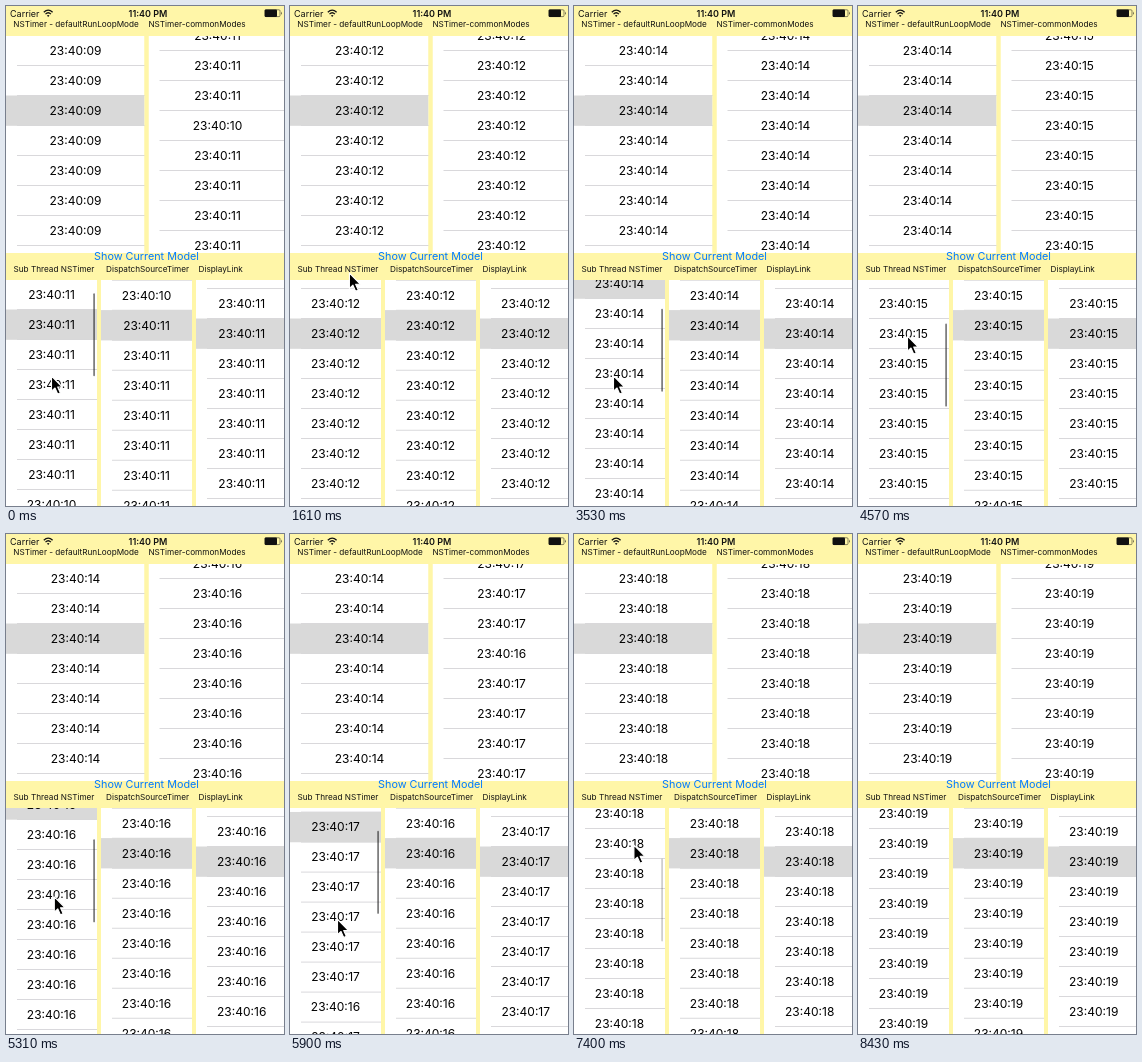
Write an HTML page that moves like this. It is 278x500 px and loops after 8.53 s.

```html
<!DOCTYPE html>
<html lang="en">
<head>
<meta charset="utf-8">
<title>Timer modes</title>
<style>
  html, body { margin: 0; width: 100%; height: 100%; overflow: hidden; background: #fff6a8; }
  #stage { display: block; width: 278px; height: 500px; }
  text { font-family: Inter, "Open Sans", sans-serif; font-size: 8.2px; fill: #111; white-space: pre; }
  .bar { font-size: 9px; }
  .clock { font-size: 9px; font-weight: 600; text-anchor: middle; }
  .link { font-size: 10.8px; fill: #007aff; text-anchor: middle; }
  .row { font-size: 12px; text-anchor: middle; fill: #000; }
</style>
</head>
<body>
<svg id="stage" viewBox="0 0 278 500">
  <rect width="278" height="500" fill="#fff6a8"/>
  <text class="bar" x="4" y="10.5">Carrier</text>
  <g fill="none" stroke="#111" stroke-width="1.3">
    <path d="M37.8 6.2Q42.2 2 46.6 6.2M39.5 8.1Q42.2 5.5 44.9 8.1"/>
    <path d="M42.2 11L40.9 9.5Q42.2 8.4 43.5 9.5Z" fill="#111" stroke="none"/>
  </g>
  <text class="clock" x="142" y="10.5">11:40 PM</text>
  <rect x="259" y="3.8" width="15" height="6.8" rx="1" fill="none" stroke="#111" stroke-width=".5"/>
  <rect x="258.7" y="3.5" width="12.3" height="7.4" rx="1" fill="#111"/>
  <path d="M275 5.5v3.4q1.4-1.7 0-3.4" fill="#111"/>
  <text x="7.3" y="21">NSTimer - defaultRunLoopMode</text>
  <text x="142.4" y="21">NSTimer-commonModes</text>
  <text x="7.5" y="266">Sub Thread NSTimer</text>
  <text x="100" y="266">DispatchSourceTimer</text>
  <text x="192.5" y="266">DisplayLink</text>
  <g id="tables"></g>
  <text class="link" x="140.5" y="254">Show Current Model</text>
  <path id="cursor" d="M0 0V15.2L3.5 12L6.2 18L8.8 16.9L6.2 11H10.8Z" stroke="#fff" stroke-width="1.1" stroke-linejoin="round"/>
</svg>
<script>
const LOOP = 8530, STEP = 147.7, ROW = 30;
const DRAG_START = 3080, DRAG_END = 6950;
const $ = id => document.getElementById(id);

function add(parent, tag, attrs) {
  const el = document.createElementNS("http://www.w3.org/2000/svg", tag);
  for (const k in attrs) el.setAttribute(k, attrs[k]);
  return parent.appendChild(el);
}

const tick = (t, period) => 11 + Math.floor(t / period);

// The default-mode timer stalls while the list is being dragged.
function stalledTick(t) {
  if (t < 300) return 9;
  return t >= DRAG_START && t < 7200 ? 14 : tick(t, 980);
}

// lateRow refreshes a little after its neighbours.
const tables = [
  { x: 0, y: 30, w: 138.5, h: 217, mid: 69.5, off: 0, sec: stalledTick },
  { x: 142.5, y: 30, w: 135.5, h: 217, mid: 69, off: 105, sec: t => tick(t, 980), lateRow: 6, lag: 250 },
  { x: 0, y: 274, w: 91, h: 226, mid: 45.5, off: 30, sec: t => tick(t, 980), lateRow: 8, lag: 200 },
  { x: 95, y: 274, w: 91, h: 226, mid: 45.5, off: 29.4, sec: t => tick(t, 990), lateRow: 1, lag: 100 },
  { x: 190, y: 274, w: 88, h: 226, mid: 45.7, off: 21, sec: t => tick(t + 330, 990) }
];

for (const tb of tables) {
  tb.view = add($("tables"), "svg", { x: tb.x, y: tb.y, width: tb.w, height: tb.h });
  add(tb.view, "rect", { width: tb.w, height: tb.h, fill: "#fff" });
  tb.list = add(tb.view, "g", { transform: `translate(0 ${-tb.off})` });
  for (let i = 0; i < 14; i++)
    add(tb.list, "rect", { x: 11, y: ROW * i + 29.2, width: tb.w, height: 0.8, fill: "#d0cfd3" });
  add(tb.list, "rect", { y: ROW * 2 - 0.5, width: tb.w, height: ROW + 0.3, fill: "#d9d9d9" });
  tb.rows = Array.from({ length: 14 }, (_, i) =>
    add(tb.list, "text", { class: "row", x: tb.mid, y: ROW * i + 19 }));
}
const scrolled = tables[2];
const thumb = add(scrolled.view, "rect", { x: 87.2, width: 1.8, height: 83, rx: 0.9, fill: "#000" });

// time, x, y of the pointer tip
const path = [
  [0, 45.5, 370], [148, 46, 378], [440, 46, 378], [900, 6, 325], [1610, 59.5, 267],
  [2050, 37, 330], [2350, 37, 330], [DRAG_START, 39.5, 420], [3530, 39.5, 370],
  [4570, 49.5, 330], [5900, 47.5, 385.5], [6650, 55.5, 317.5], [DRAG_END, 58, 312],
  [7980, 63, 310], [8400, 245, 510], [LOOP, 245, 510]
];

function pointer(t) {
  const i = path.findIndex(p => p[0] > t);
  const [a, b] = [path[i - 1], path[i]];
  const u = (t - a[0]) / (b[0] - a[0]), s = u * u * (3 - 2 * u);
  return [a[1] + (b[1] - a[1]) * s, a[2] + (b[2] - a[2]) * s];
}

function scrollOffset(t, y) {
  if (t < 100) return 30;
  if (t < DRAG_START) return 21;
  return t < DRAG_END ? 441 - y : 129;
}

function thumbOpacity(t) {
  const fade = end => Math.max(0, Math.min(1, (end - t) / 300));
  return 0.5 * (t < DRAG_START ? fade(700) : fade(7500));
}

function draw(now) {
  const t = Math.floor((now % LOOP + 20) / STEP) * STEP;
  const [x, y] = pointer(Math.min(t, LOOP - 1));
  const off = scrollOffset(t, y);
  $("cursor").setAttribute("transform", `translate(${x} ${y})`);
  scrolled.list.setAttribute("transform", `translate(0 ${-off})`);
  thumb.setAttribute("y", 2 + off * 0.375);
  thumb.setAttribute("opacity", thumbOpacity(t));
  for (const tb of tables)
    tb.rows.forEach((row, i) => {
      const sec = tb.sec(i === tb.lateRow ? t - tb.lag : t);
      row.textContent = "23:40:" + String(sec).padStart(2, "0");
    });
  requestAnimationFrame(() => draw(performance.now()));
}
draw(0);
</script>
</body>
</html>
```
